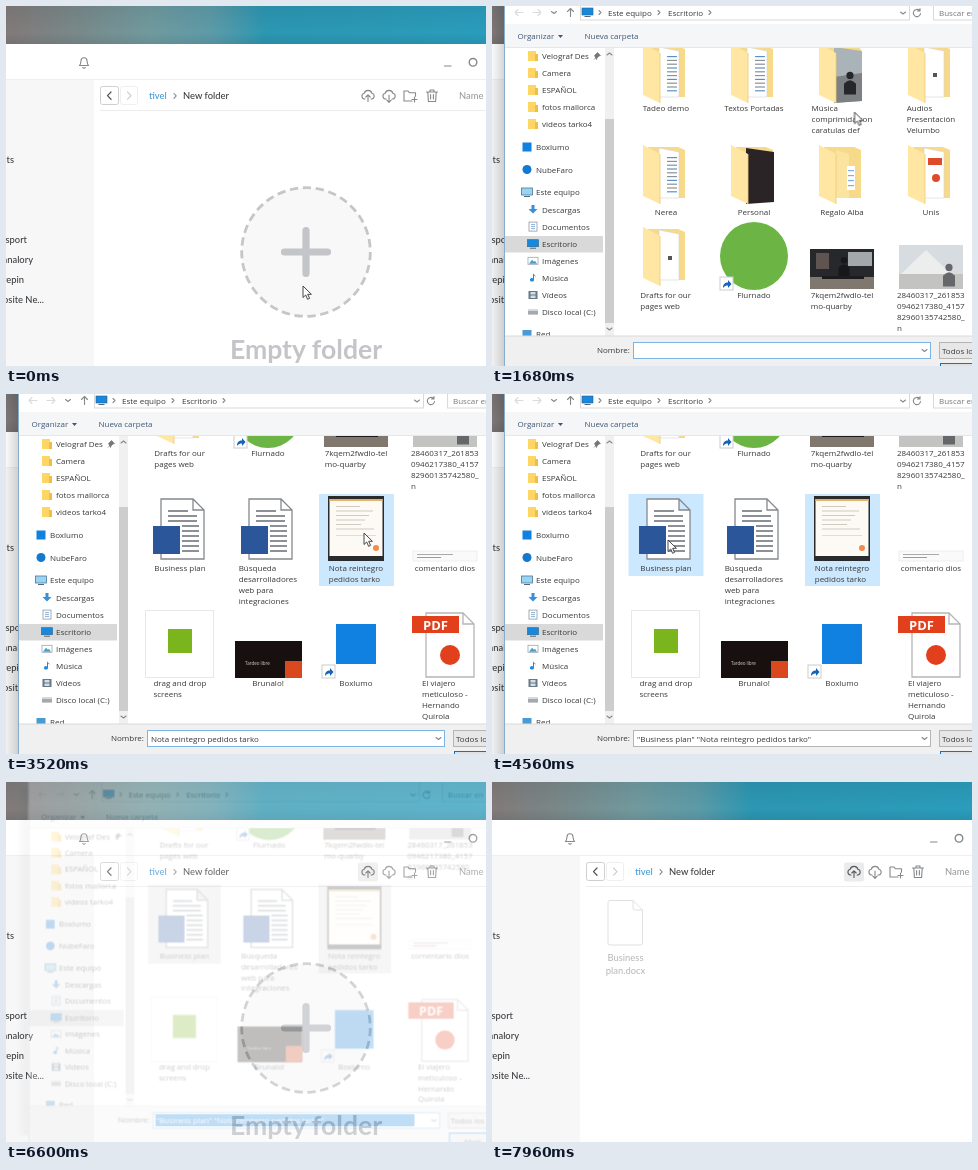
These frames come from a looping animation (480 px wide and 360 px high, 8000 ms). An HTML page:

```html
<!DOCTYPE html>
<html lang="es">
<head>
<meta charset="utf-8">
<title>Upload files</title>
<style>
  html, body { margin: 0; width: 100%; height: 100%; overflow: hidden; background: #fff; }
  svg { display: block; width: 480px; height: 360px; }
  text { white-space: pre; }
  .app { font: 500 9.4px Lato, sans-serif; fill: #3a3d40; }
  .dlg { font: 8px "Open Sans", sans-serif; fill: #383838; }
  .line { fill: none; stroke: #85888b; stroke-width: 1.1; stroke-linecap: round; stroke-linejoin: round; }
</style>
</head>
<body>
<svg id="stage" viewBox="0 0 480 360"></svg>
<script>
const LOOP = 8000;
const rect = (x, y, w, h, fill, more = '') =>
  `<rect x="${x}" y="${y}" width="${w}" height="${h}" fill="${fill}" ${more}/>`;
const path = (d, more = 'class="line"') => `<path d="${d}" ${more}/>`;
const text = (x, y, s, more = '') => `<text x="${x}" y="${y}" ${more}>${s}</text>`;
const group = (inner, more = '') => `<g ${more}>${inner}</g>`;
const at = (x, y, inner) => group(inner, `transform="translate(${x} ${y})"`);
const repeat = (n, draw) => Array.from({ length: n }, (_, i) => draw(i)).join('');

/* ---------- cloud app ---------- */
const cloud = 'M-3 3.5h-.6a2.9 2.9 0 0 1-.2-5.7a4 4 0 0 1 7.7 0a2.9 2.9 0 0 1-.2 5.7h-.6';

function appWindow() {
  const side = [[8, 157, 'Documents'], [21, 237, 'Transport'], [27, 257, 'Canalory'],
                [18, 277, 'Ludrepin'], [38, 297, 'Website Ne...']];
  return group(
    rect(0, 0, 480, 360, '#fff') +
    rect(0, 0, 480, 38, 'url(#sky)') + rect(0, 0, 480, 38, 'url(#shade)') +
    rect(0, 73, 88, 287, '#f7f7f7') + rect(0, 73, 480, 1, '#efefef') + rect(94, 104, 386, 1, '#ececec') +
    side.map(([x, y, s]) => text(x, y, s, 'text-anchor="end"')).join('') +
    path('M73.5 59.5c1.4-1.2 1.3-3 1.5-4.8a3 3 0 0 1 6 0c.2 1.8.1 3.6 1.5 4.8zM76.8 61.5a1.3 1 0 0 0 2.4 0') +
    path('M438.5 60h6.5') + '<circle class="line" cx="467" cy="56.3" r="3.8" style="stroke-width:1.4"/>' +
    rect(94.5, 80.5, 18, 18, '#fff', 'rx="2" stroke="#cfcfcf"') +
    rect(114.5, 80.5, 17, 18, '#fff', 'rx="2" stroke="#efefef"') +
    path('M105 86l-3.5 3.6l3.5 3.6', 'class="line" style="stroke:#555;stroke-width:1.3"') +
    path('M121.5 86l3.5 3.6l-3.5 3.6', 'class="line" style="stroke:#ccc"') +
    text(143, 92.5, 'tivel', 'fill="#3d9be0"') +
    path('M168 87.5l2.2 2.4l-2.2 2.4') + text(177, 92.5, 'New folder') +
    text(453, 93, 'Name', 'fill="#9a9c9f"') +
    rect(352, 80.5, 20, 19, '#ebebeb', 'id="uploadHover" rx="2"') +
    at(362, 89.5, path(cloud + 'M0 6v-6.5M-2.2 1.5L0-.7l2.2 2.2', 'class="line" id="upload"')) +
    at(383, 89.5, path(cloud + 'M0-.5v7M-2.2 4.6L0 6.8l2.2-2.2')) +
    path('M406 95h-8v-10h4l1.5 1.8h6v3.5M408.5 91v5M406 93.5h5') +
    path('M420.5 86h11M424 86v-2h4v2M421.8 86l.6 9.5h7.2l.6-9.5M424.6 88.5v4.5M427.4 88.5v4.5') +
    group(
      '<circle cx="300" cy="246" r="64.3" fill="#f8f8f8" stroke="#c4c6c9" stroke-width="2.8" pathLength="310" stroke-dasharray="6.4 3.6"/>' +
      path('M278.5 246h43M300 224.5v43', 'stroke="#c3c5c8" stroke-width="7.2" stroke-linecap="round"') +
      text(300, 352.5, 'Empty folder', 'text-anchor="middle" fill="#c3c5c8" style="font-weight:700;font-size:26.6px"'),
      'id="empty"') +
    group(
      path('M118 118.5h23l9.5 9.5v33a2 2 0 0 1-2 2h-30.5a2 2 0 0 1-2-2v-40.5a2 2 0 0 1 2-2zM141 118.5v7.5a2 2 0 0 0 2 2h7.5',
        'fill="#fff" stroke="#dfe0e1"') +
      text(133.5, 179, 'Business') + text(133.5, 191.5, 'plan.docx'),
      'id="file" text-anchor="middle" fill="#b9bbbd"'),
    'class="app"');
}

/* ---------- file dialog ---------- */
const chevron = (x, y) => path(`M${x} ${y - 2}l2 2l-2 2`);
const caret = (x, y, d = 1) => path(`M${x - 2.5} ${y - d}l2.5 ${2 * d}l2.5 ${-2 * d}`);
const shortcut = (x, y) => at(x, y, rect(0, 0, 13, 13, '#fff', 'stroke="#ccc"') +
  path('M3 11c0-4 2-5.5 5-5.5v-2.5l3.5 4l-3.5 4v-2.5c-2 0-3.5.5-5 2.5z', 'fill="#1763b5"'));

const small = {
  folder: path('M-5-5h8v3h2v7h-10z', 'fill="#ffd563"') + rect(2, -2, 3, 7, '#f0bd45'),
  screen: rect(-5.5, -4, 11, 7, '#1689dc', 'stroke="#2b5f8c" stroke-width=".6"') + rect(-3, 4, 6, 1, '#567'),
  pale: rect(-5.5, -4, 11, 7, '#9bd3f3', 'stroke="#4a7897" stroke-width=".8"') + rect(-3, 4, 6, 1, '#567'),
  down: path('M-1.5-4.5h3v4h3l-4.5 4.5l-4.5-4.5h3z', 'fill="#3a8fd9"'),
  doc: rect(-4, -4.5, 8, 9, '#fff', 'stroke="#8a98a5" stroke-width=".8"') + path('M-2-2h4M-2 0h4M-2 2h4', 'stroke="#6a9cc8" stroke-width=".8"'),
  image: rect(-5, -3.5, 10, 7, '#fff', 'stroke="#9aa7b0" stroke-width=".8"') + path('M-4 3l3-4l2 2l1-1l2 3z', 'fill="#4b9ec9"'),
  note: path('M0-5c.5 2 3 2 3 4.5c-.5-1.2-1.2-1.6-2-1.8v4.300a2 1.700 0 1 1-1-1.500z', 'fill="#1e88e5"'),
  film: rect(-4.5, -4, 9, 8, '#6b7782') + rect(-2.5, -3, 5, 2.5, '#cfe0ea') + rect(-2.5, .5, 5, 2.5, '#cfe0ea'),
  disk: rect(-5, -1.5, 10, 4, '#a4a9ad') + rect(-5, -3, 10, 1.5, '#d3d6d8'),
  square: rect(-4.5, -4.5, 9, 9, '#1081e0'),
  dot: '<circle r="4.5" fill="#1579cf"/>',
  net: rect(-4.5, -4, 9, 6, '#4a9bd4')
};
const entry = (x, y, kind, label) => at(x, y, small[kind]) + text(x + 9, y + 3, label);

const person = (x, y, k = 1, fill = '#25272b') => group('<circle cy="-8" r="3"/><path d="M-5 8v-9q5-6 10 0v9z"/>',
  `transform="translate(${x} ${y}) scale(${k})" fill="${fill}"`);
const folder = content => path('M-18-27h30l7 3v48h-37z', 'fill="#f7d98a"') + content +
  path('M-23-29l17 9v50l-17-8z', 'fill="#ffe7a3"') + path('M-6-20v50', 'stroke="#eecb75" stroke-width=".8"');
const sheet = path('M-7-26l20 4v46h-20z', 'fill="#fff" stroke="#d5d5d5" stroke-width=".6"');
const written = sheet + repeat(10, i => rect(1, -17 + i * 3.8, 10, 1.2, i % 3 ? '#8a929a' : '#5b93c9'));
const picture = fill => path('M-8-26l28 4v50l-28 2z', `fill="${fill}"`);
const page = (x, y, w, h, stroke) =>
  path(`M${x} ${y}h${w - 11}l11 11v${h - 11}h${-w}zM${x + w - 11} ${y}v11h11`, `fill="#fff" stroke="${stroke}" stroke-width="1.3"`);

const art = {
  docs: folder(written),
  sparse: folder(sheet + rect(2, 0, 4, 4, '#555')),
  tinted: folder(path('M-6-24l13 4v44h-13z', 'fill="#fbe3a0"') + rect(5, -8, 8, 24, '#fff') + repeat(4, i => rect(6, -4 + i * 5, 6, 1.2, '#7fb0dd'))),
  photo: folder(picture('#aab3b8') + path('M-8 4l28-4v28l-28 2z', 'fill="#7d8183"') + person(8, 12, 1.2)),
  dark: folder(picture('#2b2427')),
  red: folder(sheet + rect(-3, -16, 14, 7, '#dd4b2a') + '<circle cx="5" cy="4" r="4" fill="#dd4b2a"/>'),
  green: '<circle r="34" fill="#6cb544"/>' + shortcut(-34, 21),
  night: rect(-32, -7, 64, 40, '#26282b') + rect(-32, 21, 64, 12, '#80776f') + rect(-26, -3, 13, 16, '#5f5450') +
    rect(6, -4, 24, 14, '#a3a8aa') + person(2, 13, 1.1, '#16181a') + rect(-20, 20, 42, 3, '#1c1c1e'),
  plaza: rect(-32, -11, 64, 44, '#d6dce0') + path('M-30 18l25-24l25 24z', 'fill="#eceeee"') +
    rect(-32, 18, 64, 15, '#c3c3c1') + person(18, 21, 1.2, '#66676a'),
  word: page(-19, -31, 43, 60, '#85898d') +
    repeat(9, i => rect(i < 3 ? -12 : 2, -20 + i * 5, i < 1 ? 20 : i < 3 ? 29 : 17, 2, '#8b9197')) +
    rect(-27, -4, 27, 28, '#2b579a'),
  note: rect(-28, -34, 56, 65, '#2a2b2d') + rect(-26.5, -31, 53, 57, '#fdfaf5') + rect(-26.5, -31, 53, 2, '#e2b36a') +
    repeat(6, i => rect(-20, -24 + i * 4.5, 24 + (i * 13) % 17, 1, '#cfcac0')) +
    rect(-20, 5, 40, 1, '#ddd') + '<circle cx="20" cy="18" r="3" fill="#f08b4c"/>',
  strip: rect(-32, 21, 64, 10, '#fafafa', 'stroke="#e4e4e4" stroke-width=".6"') + rect(-28, 24, 36, 1, '#aaa') + rect(-28, 27, 24, 1, '#c88'),
  clip: rect(-34.5, -33.5, 68, 67, '#fff', 'stroke="#e8e8e8"') + rect(-12, -15, 24, 24, '#7ab51d'),
  slide: rect(-33, -3, 67, 37, '#17100f') + text(-23, 21, 'Tardeo libre', 'fill="#d8d0cc" style="font-size:4.5px"') + rect(17, 17, 17, 17, '#d9481f'),
  blue: rect(-20, -20, 40, 40, '#1081e0') + shortcut(-34, 21),
  pdf: page(-19, -31, 48, 64, '#b5b5b5') + rect(-33, -28, 47, 17, '#e2401c') +
    text(-9.5, -14, 'PDF', 'text-anchor="middle" fill="#fff" style="font-weight:700;font-size:13px"') +
    '<circle cx="5" cy="11" r="10" fill="#e2401c"/>'
};

const columns = [174, 262, 350, 439];
const rows = [
  { icon: 67, label: 105, items: [['docs', 'Tadeo demo'], ['docs', 'Textos Portadas'],
    ['photo', 'Música|comprimida con|caratulas def'], ['sparse', 'Audios|Presentación|Velumbo']] },
  { icon: 168, label: 209, items: [['docs', 'Nerea'], ['dark', 'Personal'], ['tinted', 'Regalo Alba'], ['red', 'Unis']] },
  { icon: 250, label: 292, items: [['sparse', 'Drafts for our|pages web'], ['green', 'Flurnado'],
    ['night', '7kqem2fwdlo-tel|mo-quarby'], ['plaza', '28460317_261853|0946217380_4157|82960135742580_|n']] },
  { icon: 366, label: 407, items: [['word', 'Business plan'], ['word', 'Búsqueda|desarrolladores|web para|integraciones'],
    ['note', 'Nota reintegro|pedidos tarko'], ['strip', 'comentario dios']] },
  { icon: 480, label: 522, items: [['clip', 'drag and drop|screens'], ['slide', 'Brunalo!'],
    ['blue', 'Boxlumo'], ['pdf', 'El viajero|meticuloso -|Hernando|Quirola']] }
];

function fileList() {
  const cells = rows.map(row => row.items.map(([kind, label], i) =>
    at(columns[i], row.icon, art[kind]) +
    at(columns[i], row.label, group(label.split('|').map((s, n) => text(0, n * 11, s)).join(''), 'class="label"'))
  ).join('')).join('');
  return group(group(
    rect(314, 132, 74, 81, '#e5f3ff', 'id="hoverFolder"') +
    rect(314, 330, 74, 92, '#e5f3ff', 'id="hoverNote"') +
    rect(313, 330, 75, 92, '#cce8ff', 'id="pickNote"') +
    rect(136.5, 330, 75, 82, '#cce8ff', 'id="pickPlan"') + cells,
    'id="list"'), 'clip-path="url(#body)"');
}

function sidebar() {
  const folders = ['Velograf Des', 'Camera', 'ESPAÑOL', 'fotos mallorca', 'videos tarko4'];
  const places = [['down', 'Descargas'], ['doc', 'Documentos'], ['screen', 'Escritorio'], ['image', 'Imágenes'],
                  ['note', 'Música'], ['film', 'Vídeos'], ['disk', 'Disco local (C:)']];
  return group(
    rect(13, 230, 98, 16.5, '#d9d9d9') +
    folders.map((s, i) => entry(41, 50 + i * 17, 'folder', s)).join('') +
    path('M102.5 49.5l3-3l3 3l-1.5.5l-2 2l-.5 1.500zM104 51.5l-2 2', 'fill="#777" stroke="#777" stroke-width=".7"') +
    entry(35, 141, 'square', 'Boxlumo') + entry(35, 163.5, 'dot', 'NubeFaro') + entry(35, 186, 'pale', 'Este equipo') +
    places.map(([kind, s], i) => entry(41, 203.5 + i * 17.1, kind, s)).join('') +
    entry(35, 328, 'net', 'Red') +
    rect(113, 42, 9, 288, '#f0f0f0') + rect(113, 113, 9, 204, '#cdcdcd') + caret(117.5, 48, -1) + caret(117.5, 323),
    'clip-path="url(#body)"');
}

function dialog() {
  const both = '"Business plan" "Nota reintegro pedidos tarko"';
  return group(
    rect(0, 0, 12, 360, 'url(#shadow)') +
    rect(12, -12, 500, 390, '#fff') +
    group(path('M31 6.5h-8m3-3l-3 3l3 3M41 6.5h8m-3-3l3 3l-3 3'), 'opacity=".3"') + caret(62, 6.5) +
    path('M78.5 10.5v-8m-3 3l3-3l3 3') +
    rect(88.5, -12, 329, 26, 'none', 'stroke="#d9d9d9"') + at(95.5, 6, small.screen) +
    chevron(107, 6.5) + text(116, 9.5, 'Este equipo') + chevron(166, 6.5) + text(176, 9.5, 'Escritorio') + chevron(217, 6.5) +
    caret(411, 7) + path('M427.5 4.5a3.6 3.6 0 1 0 1 3M428 2.5v2.5h-2.5') +
    rect(441.5, -12, 80, 26, 'none', 'stroke="#d9d9d9"') + text(447, 9.5, 'Buscar en', 'fill="#777"') +
    rect(12, 18, 500, 24, '#f5f6f7') + rect(12, 41, 500, 1, '#e6e7e8') +
    group(text(25.5, 33, 'Organizar') + path('M66 29h5l-2.5 3z', '') + text(92.5, 33, 'Nueva carpeta'), 'fill="#3f5675"') +
    sidebar() + fileList() +
    rect(12, 330, 500, 48, '#f0f0f0') + rect(12, 329.5, 500, 1, '#dcdcdc') +
    text(105, 347, 'Nombre:') +
    rect(141.5, 336.5, 297, 16, '#fff', 'id="field"') + caret(432.5, 344.5) +
    text(145, 347.5, 'Nota reintegro pedidos tarko', 'id="nameOne"') +
    text(145, 347.5, both, 'id="nameBoth"') +
    group(rect(144, 338, 268, 12, '#0078d7') + text(145, 347.5, both, 'fill="#fff"'), 'id="nameMarked"') +
    rect(447.5, 336.5, 70, 16, '#e7e7e7', 'stroke="#b5b5b5"') + text(450, 347.5, 'Todos los') +
    rect(448.5, 357.5, 60, 18, '#e1e1e1', 'stroke="#0078d7"') + text(463, 369, 'Abrir') +
    rect(12, -12, 1, 390, '#86aecb'),
    'id="dialog" class="dlg" style="transform-origin:300px 175px"');
}

const stops = list => list.map(([o, c, a = 1]) => `<stop offset="${o}" stop-color="${c}" stop-opacity="${a}"/>`).join('');
const stage = document.getElementById('stage');
stage.innerHTML = `<defs>
  <linearGradient id="sky">${stops([[0, '#827a79'], [.12, '#7b8686'], [.3, '#719a9e'], [.43, '#5c9ba8'], [.54, '#2c97b2'], [1, '#2a9dbc']])}</linearGradient>
  <linearGradient id="shade" x2="0" y2="1">${stops([[0, '#123', .08], [.7, '#123', 0], [1, '#123', .1]])}</linearGradient>
  <linearGradient id="shadow">${stops([[0, '#000', .02], [1, '#000', .16]])}</linearGradient>
  <clipPath id="body"><rect x="12" y="42" width="500" height="288"/></clipPath>
</defs>` + appWindow() + dialog() +
  path('M0 0v11.5l2.7-2.5l1.9 4.3l2-.9l-1.9-4.1h3.7z', 'id="cursor" fill="#fff" stroke="#333" stroke-width=".9" stroke-linejoin="round"');

// Labels are left-aligned blocks, centred under their icons.
for (const label of stage.querySelectorAll('.label'))
  label.setAttribute('transform', `translate(${-label.getBBox().width / 2} 0)`);

/* ---------- motion: tables of [time, value] ---------- */
function play(id, prop, table, easing) {
  const frames = table.map(([t, v]) => ({ offset: t / LOOP, [prop]: v, easing }));
  frames.push({ offset: 1, [prop]: table.at(-1)[1] });
  document.getElementById(id).animate(frames, { duration: LOOP, iterations: Infinity });
}
const hold = (id, prop, table) => play(id, prop, table, 'step-end');
const show = (id, from, to = LOOP) =>
  hold(id, 'opacity', [...(from ? [[0, 0]] : []), [from, 1], ...(to < LOOP ? [[to, 0]] : [])]);

const spots = [[0, 297, 280], [240, 297, 280], [880, 363, 88], [1480, 363, 88], [2200, 360, 200], [2560, 360, 200],
  [3160, 358, 139], [3640, 358, 139], [4240, 176, 146], [4640, 176, 146], [5320, 472, 366]];
play('cursor', 'transform', spots.map(([t, x, y]) => [t, `translate(${x}px, ${y}px)`]), 'ease-in-out');

play('dialog', 'opacity', [[0, 0], [1360, 0], [1520, 1], [6500, 1], [6635, 0]], 'linear');
play('dialog', 'transform', [[0, 'scale(.95)'], [1360, 'scale(.95)'], [1520, 'scale(1)'], [6500, 'scale(1)'], [6635, 'scale(.953)']], 'linear');
hold('list', 'transform', [[0, 0], [2600, -77], [2800, -154], [3000, -230]].map(([t, y]) => [t, `translateY(${y}px)`]));

show('uploadHover', 840);
hold('upload', 'stroke', [[0, '#85888b'], [840, '#55585b']]);
show('hoverFolder', 2120, 2600);
show('hoverNote', 3040, 3320);
show('pickNote', 3320);
show('pickPlan', 4400);
for (const id of ['pickNote', 'pickPlan']) hold(id, 'fill', [[0, '#cce8ff'], [6440, '#d9d9d9']]);
hold('field', 'stroke', [[0, '#7db4e6'], [4400, '#b5b5b5'], [6440, '#7db4e6']]);
show('nameOne', 3320, 4400);
show('nameBoth', 4400, 6440);
show('nameMarked', 6440);
show('empty', 0, 6880);
play('file', 'opacity', [[0, 0], [6920, 0], [7160, 1]], 'linear');
</script>
</body>
</html>
```
